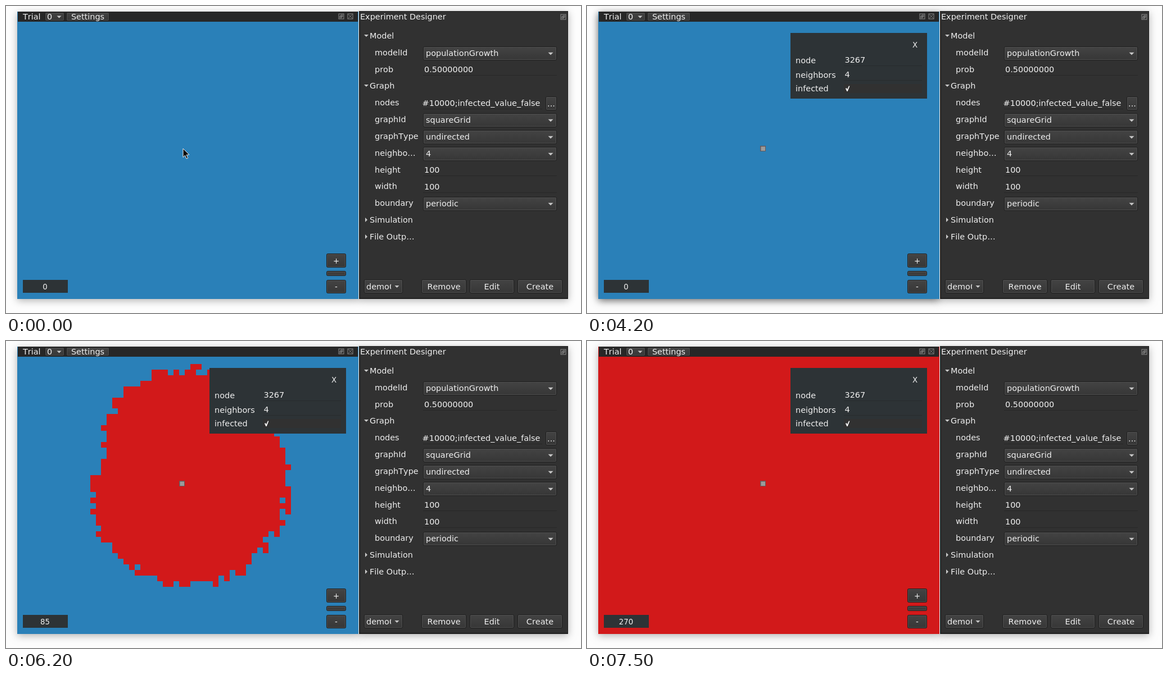
An HTML page with a canvas that plays this animation: 1023 px wide and 547 px high, repeating every 7.6 s.

```html
<!DOCTYPE html>
<html lang="en">
<head>
<meta charset="utf-8">
<title>Population growth</title>
<style>
html, body { margin: 0; width: 100%; height: 100%; overflow: hidden; background: #fdfdfd; }
canvas { display: block; }
</style>
</head>
<body>
<canvas id="stage" width="1023" height="547"></canvas>
<script>
const ctx = document.getElementById('stage').getContext('2d');
const LOOP = 7600, TICK = 100;
const FONT = '"DejaVu Sans", sans-serif';
const CELL = 9.92, ORIGIN_X = 308.3, ORIGIN_Y = 249.4;
const HALF_COLS = 32, HALF_ROWS = 27;
const BLUE = '#2a80b8', RED = '#d2191a', PANEL = '#313131', OVERLAY = '#2d3336';

// Relative growth speed in evenly spaced directions, clockwise from the right
const REACH = [1.07, 1.03, 1.03, 0.96, 0.94, 0.8, 1.12, 1.15, 1.02];
const ROUGHNESS = 2;

// [time, x, y]; no position hides the pointer
const POINTER = [
  [0, 315, 254], [200, 313, 254], [800, 309, 256], [1500, 352, 217], [1700, 443, 149],
  [4100, 586, 131], [4200], [6600, 620, 90], [6700, 283, 35], [6800]
];

const lerp = (a, b, k) => a + (b - a) * k;
const clamp01 = k => Math.min(1, Math.max(0, k));

function seeded(seed) {
  return () => (seed = (seed * 16807) % 2147483647) / 2147483647;
}

function reach(x, y) {
  const n = REACH.length;
  const a = (Math.atan2(y, x) / (2 * Math.PI) * n + n) % n, i = Math.floor(a);
  return lerp(REACH[i % n], REACH[(i + 1) % n], a - i);
}

// Spreads from the middle to the cheapest neighbour; each cell keeps the front radius that takes it.
function growCells() {
  const random = seeded(3267), seen = new Set(['0,0']);
  const frontier = [{ col: 0, row: 0, cost: 0 }], cells = [];
  let radius = 0;
  while (frontier.length) {
    let best = 0;
    frontier.forEach((cell, i) => { if (cell.cost < frontier[best].cost) best = i; });
    const [{ col, row, cost }] = frontier.splice(best, 1);
    radius = Math.max(radius, cost);
    cells.push({ col, row, radius });
    for (const [dx, dy] of [[1, 0], [0, 1], [-1, 0], [0, -1]]) {
      const c = col + dx, r = row + dy, key = c + ',' + r;
      if (Math.abs(c) > HALF_COLS || Math.abs(r) > HALF_ROWS || seen.has(key)) continue;
      seen.add(key);
      frontier.push({ col: c, row: r, cost: Math.hypot(c, r) / reach(c, r) + (random() - 0.5) * ROUGHNESS });
    }
  }
  return cells;
}
const cells = growCells();

const stepAt = t => Math.round(t < 6700 ? Math.max(0, (t - 5370) * 0.103) : 137 + (t - 6700) / 6);
const frontRadius = step => 0.2285 * Math.max(0, step - 6);

function fill(x, y, w, h, color) {
  ctx.fillStyle = color;
  ctx.fillRect(x, y, w, h);
}

function text(str, x, y, align = 'left', size = 14.45) {
  ctx.font = `${size}px ${FONT}`;
  ctx.fontKerning = 'none';
  ctx.textAlign = align;
  ctx.fillStyle = '#f0f0f0';
  ctx.fillText(str, x, y + 5);
}

function shape(points, color) {
  ctx.beginPath();
  points.forEach(([x, y]) => ctx.lineTo(x, y));
  ctx.closePath();
  ctx.fillStyle = color;
  ctx.fill();
}

const downArrow = (x, y, r = 4.5) => shape([[x - r, y - r / 2], [x + r, y - r / 2], [x, y + r / 2]], '#c8c8c8');
const rightArrow = (x, y) => shape([[x - 2, y - 4], [x + 2, y], [x - 2, y + 4]], '#c8c8c8');

function button(x, y, w, h, label, size) {
  const shade = ctx.createLinearGradient(0, y, 0, y + h);
  shade.addColorStop(0, '#444');
  shade.addColorStop(1, '#363636');
  ctx.beginPath();
  ctx.roundRect(x + 0.5, y + 0.5, w - 1, h - 1, 2);
  ctx.fillStyle = shade;
  ctx.fill();
  ctx.strokeStyle = '#1d1d1d';
  ctx.stroke();
  ctx.beginPath();
  ctx.roundRect(x + 1.5, y + 1.5, w - 3, h - 3, 1);
  ctx.strokeStyle = '#505050';
  ctx.stroke();
  if (label) text(label, x + w / 2, y + h / 2, 'center', size);
}

function combo(y, value) {
  button(742, y - 12, 238, 25);
  text(value, 747, y);
  downArrow(969, y + 1);
}

function field(y, value) {
  text(value, 744, y);
  fill(742, y + 10, 238, 1, '#272727');
}

function icon(x, y, close) {
  ctx.strokeStyle = '#8c8c8c';
  ctx.strokeRect(x - 4.5, y - 4.5, 9, 9);
  if (close) {
    ctx.beginPath();
    ctx.moveTo(x - 3, y - 3); ctx.lineTo(x + 3, y + 3);
    ctx.moveTo(x + 3, y - 3); ctx.lineTo(x - 3, y + 3);
    ctx.stroke();
  } else {
    ctx.strokeRect(x - 2.5, y - 0.5, 3, 3);
    ctx.strokeRect(x - 0.5, y - 2.5, 3, 3);
  }
}

function shadow(x, y, w, h, alpha) {
  ctx.save();
  ctx.shadowColor = `rgba(0,0,0,${alpha})`;
  ctx.shadowBlur = 13;
  ctx.shadowOffsetY = 3;
  fill(x, y, w, h, '#222');
  ctx.restore();
}

function drawGrid(step) {
  const edgeX = c => Math.round(ORIGIN_X + c * CELL), edgeY = r => Math.round(ORIGIN_Y + r * CELL);
  const limit = frontRadius(step);
  ctx.save();
  ctx.beginPath();
  ctx.rect(20, 10, 607, 512);
  ctx.clip();
  fill(20, 10, 607, 512, BLUE);
  for (const { col, row, radius } of step ? cells : []) {
    if (radius > limit) break;
    const x = edgeX(col), y = edgeY(row);
    fill(x, y, edgeX(col + 1) - x, edgeY(row + 1) - y, RED);
  }
  ctx.restore();
}

function drawPopup(checked) {
  fill(308, 249, 10, 10, '#64585a');
  fill(309.5, 250.5, 7.5, 7.5, '#9b9b9b');
  fill(362, 48, 243, 117, OVERLAY);
  text('X', 583.5, 69, 'center', 13.3);
  text('node', 371, 97);
  text('3267', 458.5, 96);
  text('neighbors', 371, 123);
  text('4', 458.5, 122);
  text('infected', 371, 147);
  fill(457, 106, 139, 1, '#272b2d');
  fill(457, 132, 139, 1, '#272b2d');
  fill(457, 139, 139, 16, PANEL);
  if (checked) {
    shape([[460, 147], [461.7, 146], [463, 148.5], [465.8, 142.5], [467.5, 142.5], [463.7, 152], [462.3, 152]], '#f4f4f4');
  } else {
    fill(457.5, 141, 13, 13, '#222');
    fill(458.5, 142, 11, 11, '#2e2e2e');
  }
}

function drawTrial(t) {
  const step = stepAt(t);
  drawGrid(step);
  fill(21, 10, 605, 18, '#272727');
  text('Trial', 30, 19);
  button(69, 11, 35, 16);
  text('0', 73, 19);
  downArrow(94.5, 19.5, 4);
  button(107, 11, 77, 16, 'Settings');
  icon(596.5, 18.5);
  icon(612.5, 18.5, true);
  if (t >= 1200) drawPopup(t >= 2800);
  button(570, 441, 35, 25, '+', 13.3);
  button(570, 472, 35, 9);
  button(570, 488, 35, 24, '-', 13.3);
  fill(30, 488, 80, 23, OVERLAY);
  text(step, 69.5, 499.5, 'center', 13.3);
}

function drawDesigner() {
  fill(628, 9, 372, 513, '#202020');
  fill(630, 10, 369, 510, PANEL);
  fill(627, 10, 1, 512, '#f4f8fa');
  text('Experiment Designer', 630, 19);
  icon(991.5, 19.5);

  downArrow(641, 53, 4);
  text('Model', 647, 53);
  downArrow(641, 142, 4);
  text('Graph', 647, 142);
  rightArrow(641, 381);
  text('Simulation', 647, 381);
  rightArrow(641, 411);
  text('File Outp…', 647, 411);

  ['modelId', 'prob', '', 'nodes', 'graphId', 'graphType', 'neighbo…', 'height', 'width', 'boundary']
    .forEach((label, i) => text(label, 656, Math.round(83 + i * 29.8)));

  combo(84, 'populationGrowth');
  field(113, '0.50000000');
  text('#10000;infected_value_false', 950.5, 173, 'right');
  fill(742, 183, 212, 1, '#272727');
  button(960, 161, 20, 25, '...');
  combo(203, 'squareGrid');
  combo(233, 'undirected');
  combo(263, '4');
  field(292, '100');
  field(322, '100');
  combo(352, 'periodic');

  button(637, 487, 69, 25);
  ctx.save();
  ctx.beginPath();
  ctx.rect(638, 488, 47, 23);
  ctx.clip();
  text('demo0', 641, 499.5);
  ctx.restore();
  downArrow(695.5, 500, 4);
  button(739, 487, 80, 25, 'Remove');
  button(825, 487, 79, 25, 'Edit');
  button(910, 487, 80, 25, 'Create');
}

function drawPointer(t) {
  let [, x, y] = POINTER.findLast(p => p[0] <= t);
  if (x === undefined) return;
  if (t >= 2000 && t < 4100) {
    // Drift over the checkbox and back
    const k = clamp01((t - 1900) / 800);
    x += 16 * k + 12 * Math.sin(Math.PI * k);
    y -= 6 * Math.sin(Math.PI * k);
  }
  const arrow = [[0, 0], [0, 15.5], [3.5, 12.2], [6, 18], [8.6, 17], [6.1, 11.2], [11, 11]];
  shape(arrow.map(([dx, dy]) => [x + dx, y + dy]), '#0a0a0a');
  ctx.strokeStyle = '#f0f0f0';
  ctx.stroke();
}

function draw(t) {
  const focused = t >= 1100 && t < 5300;
  fill(0, 0, 1023, 547, '#fdfdfd');
  shadow(20, 10, 607, 512, focused ? 0.6 : 0.3);
  shadow(628, 9, 372, 513, 0.3);
  drawTrial(t);
  drawDesigner();
  drawPointer(t);
}

let shown = -1;
function frame() {
  const t = Math.floor(performance.now() % LOOP / TICK) * TICK;
  if (t !== shown) draw(shown = t);
  requestAnimationFrame(frame);
}
frame();
</script>
</body>
</html>
```
